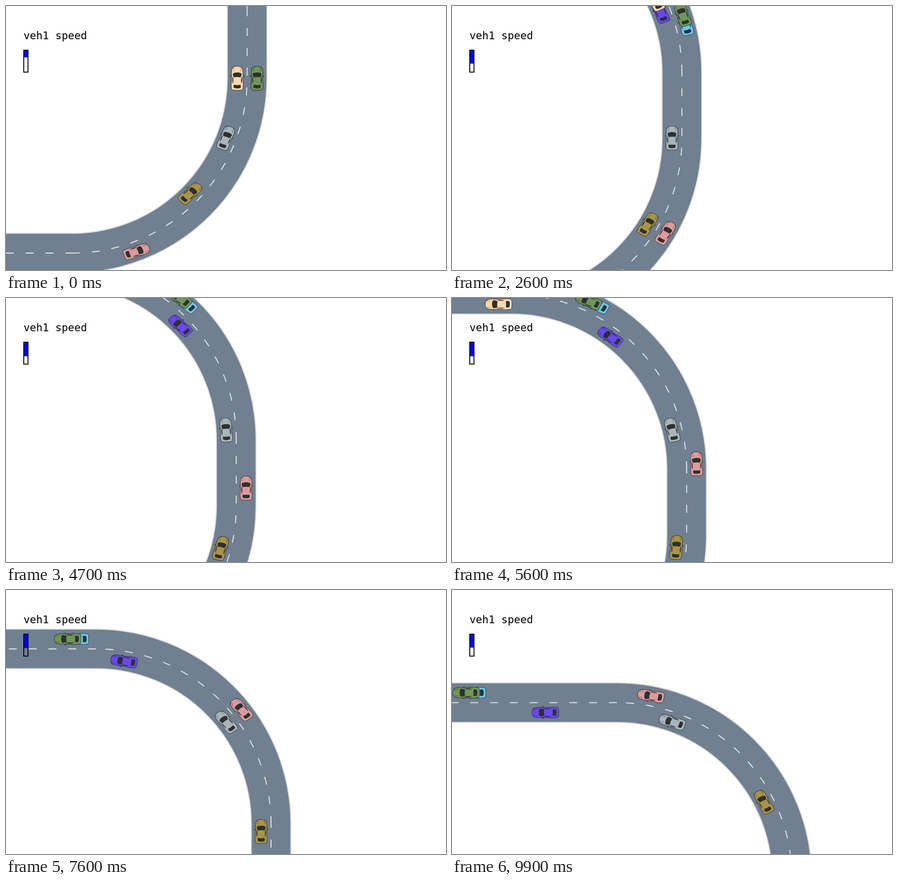
An HTML page without scripts that plays this animation: 966 px wide and 580 px high, repeating every 10 s.

```html
<!DOCTYPE html>
<html lang="en">
<head>
<meta charset="utf-8">
<title>Stadium road</title>
<style>
/* distance driven by each car, 0 = start of the upper bend */
@property --grey { syntax: '<number>'; inherits: true; initial-value: 0 }
@property --gold { syntax: '<number>'; inherits: true; initial-value: 0 }
@property --pink { syntax: '<number>'; inherits: true; initial-value: 0 }
@property --peach { syntax: '<number>'; inherits: true; initial-value: 0 }
@property --purple { syntax: '<number>'; inherits: true; initial-value: 0 }
@property --green { syntax: '<number>'; inherits: true; initial-value: 0 }
@property --cyan { syntax: '<number>'; inherits: true; initial-value: 0 }
@property --bar { syntax: '<number>'; inherits: true; initial-value: 0 }

html, body { margin: 0; width: 100%; height: 100%; overflow: hidden; background: #fff }
svg { display: block; width: 966px; height: 580px; animation: drive 10s infinite }

@keyframes drive {
  0% { --grey: -279.4; --gold: -424.7; --pink: -638; --peach: -145.2; --purple: -145.2; --green: -145.2; --cyan: -145.2; --bar: 16; animation-timing-function: steps(5) }
  5% { --grey: -261; --gold: -409; --pink: -592; --peach: -92; --purple: -100; --green: -97; --cyan: -103.5; --bar: 20; animation-timing-function: steps(1) }
  7% { --grey: -257; --gold: -406; --pink: -582.5; --peach: -81; --purple: -90.5; --green: -87; --cyan: -94.5; --bar: 20.7; animation-timing-function: steps(10) }
  17% { --grey: -206.8; --gold: -373.4; --pink: -473.9; --peach: 47.8; --purple: 22.5; --green: 28; --cyan: 6.5; --bar: 27; animation-timing-function: steps(9) }
  26% { --grey: -144; --gold: -343; --pink: -363; --peach: 167; --purple: 138; --green: 130; --cyan: 109; --bar: 29.5; animation-timing-function: steps(9) }
  35% { --grey: -72; --gold: -309.3; --pink: -249.2; --peach: 292; --purple: 233.5; --green: 233.7; --cyan: 213.8; --bar: 30.5; animation-timing-function: steps(10) }
  45% { --grey: 13.6; --gold: -246; --pink: -118.8; --peach: 440; --purple: 273.5; --green: 345.5; --cyan: 328.5; --bar: 31; animation-timing-function: steps(1) }
  47% { --grey: 22; --gold: -239.1; --pink: -105.7; --peach: 455; --purple: 278; --green: 357; --cyan: 340; --bar: 31; animation-timing-function: steps(9) }
  56% { --grey: 87; --gold: -172; --pink: 12; --peach: 598; --purple: 338; --green: 464; --cyan: 446; --bar: 31; animation-timing-function: steps(9) }
  65% { --grey: 151.8; --gold: -102.5; --pink: 129.7; --peach: 740; --purple: 402.9; --green: 571; --cyan: 553; --bar: 31; animation-timing-function: steps(11) }
  76% { --grey: 241; --gold: -17; --pink: 271; --peach: 900; --purple: 508; --green: 700; --cyan: 683; --bar: 30.5; animation-timing-function: steps(10) }
  86% { --grey: 328.7; --gold: 62.8; --pink: 398.3; --peach: 1050; --purple: 608.5; --green: 816.8; --cyan: 800.8; --bar: 30; animation-timing-function: steps(13) }
  99%, 100% { --grey: 446; --gold: 172.6; --pink: 562.7; --peach: 1240; --purple: 726.4; --green: 968.7; --cyan: 954.7; --bar: 29.5; animation-timing-function: steps(1) }
}

/* distance --d in a lane of radius --r gives bend angle and position */
.spot {
  --r: 362.5;
  --a: calc(clamp(-1.5708, (var(--d) + 145) / var(--r), 0) + clamp(0, var(--d) / var(--r), 1.5708));
  --x: calc(var(--r) * cos(var(--a)) - max(0, var(--d) - var(--r) * 1.5708));
  --y: calc(0 - clamp(-145, var(--d), 0) - var(--r) * sin(var(--a)));
}
.outer { --r: 406 }
.world {
  --d: var(--grey);
  transform: translate(calc((483 - var(--x)) * 1px), calc((290 - var(--y)) * 1px));
}
.car {
  transform: translate(calc(var(--x) * 1px), calc(var(--y) * 1px)) scale(1, .9) rotate(calc(var(--a) * -1rad));
}
.level { height: calc(var(--bar) * 1px) }
.edge { stroke: #dcdcdc; stroke-width: 2.2 }
.dash { stroke: #e6e6e6; stroke-width: 2.1; stroke-dasharray: 17.4 26.1 }
text { font: 23.2px 'DejaVu Sans Mono', monospace; white-space: pre }
</style>
</head>
<body>
<svg viewBox="0 0 966 580">
  <defs>
    <g id="car">
      <path d="M-12-7l-3 1.2q-.8 1.6.4 1.8l2.8-1M12-7l3 1.2q.8 1.6-.4 1.8l-2.8-1" stroke="#222" stroke-width=".8"/>
      <path d="M0-29.2C6-29.2 10-27.8 11.6-23C13.2-17 12.7-10 12.4-4C12.1 0 12.3 6 13 12C13.6 18 13 25 11.6 27.6C10 29.1 5 29.2 0 29.2S-10 29.1-11.6 27.6C-13 25-13.6 18-13 12C-12.3 6-12.1 0-12.4-4C-12.7-10-13.2-17-11.6-23C-10-27.8-6-29.2 0-29.2Z" stroke="#222" stroke-width=".9"/>
      <path d="M-7-28.2Q-10.4-26-11.2-22.5L-8.6-25ZM7-28.2Q10.4-26 11.2-22.5L8.6-25Z" fill="#222" fill-opacity=".75"/>
      <path d="M-7.5-16Q-8-22-5-27M7.5-16Q8-22 5-27M-10-18l2-4M10-18l-2-4" fill="none" stroke="#000" stroke-opacity=".35" stroke-width=".8"/>
      <g fill="#2e312f">
        <path d="M-9.8-10.5Q-8.5-14.2 0-14.4T9.8-10.5Q9.5-6 7.2-2.4Q0-4-7.2-2.4Q-9.5-6-9.8-10.5Z"/>
        <path d="M-7.2 15.8Q0 17.2 7.2 15.8Q8.6 20 7.4 23.3Q0 26-7.4 23.3Q-8.6 20-7.2 15.8Z"/>
        <path d="M-10.3-5.5Q-8.2-1-8.3 5L-8.8 13Q-10.4 11-10.5 5ZM10.3-5.5Q8.2-1 8.3 5L8.8 13Q10.4 11 10.5 5Z"/>
      </g>
    </g>
  </defs>

  <g class="world spot">
    <g fill="none">
      <path d="M-1500-384.25H0A384.25 384.25 0 0 1 384.25 0V145A384.25 384.25 0 0 1 0 529.25H-600" stroke="#708090" stroke-width="87"/>
      <path class="edge" d="M-1500-340.75H0A340.75 340.75 0 0 1 340.75 0V145A340.75 340.75 0 0 1 0 485.75H-600"/>
      <path class="edge" d="M-1500-427.75H0A427.75 427.75 0 0 1 427.75 0V145A427.75 427.75 0 0 1 0 572.75H-600"/>
      <path class="dash" d="M-319.25 529.25H0"/>
      <path class="dash" d="M0 529.25A384.25 384.25 0 0 0 384.25 145V0"/>
      <path class="dash" d="M384.25 0A384.25 384.25 0 0 0 0-384.25"/>
      <path class="dash" d="M0-384.25H-1500"/>
    </g>
    <use href="#car" class="car spot" style="--d: var(--purple)" fill="#6a48f2"/>
    <use href="#car" class="car spot outer" style="--d: var(--cyan)" fill="#68c6ee"/>
    <use href="#car" class="car spot" style="--d: var(--peach)" fill="#ffd9b0"/>
    <use href="#car" class="car spot outer" style="--d: var(--green)" fill="#70965a"/>
    <use href="#car" class="car spot" style="--d: var(--gold)" fill="#a9954a"/>
    <use href="#car" class="car spot outer" style="--d: var(--pink)" fill="#dc9ba0"/>
    <use href="#car" class="car spot" style="--d: var(--grey)" fill="#a7b6bb"/>
  </g>

  <text x="38.4" y="73">veh1 speed</text>
  <rect class="level" x="39" y="97" width="9.3" fill="#00f"/>
  <rect x="39" y="97" width="9.3" height="48.3" fill="none" stroke="#000" stroke-width="2"/>
</svg>
</body>
</html>
```
